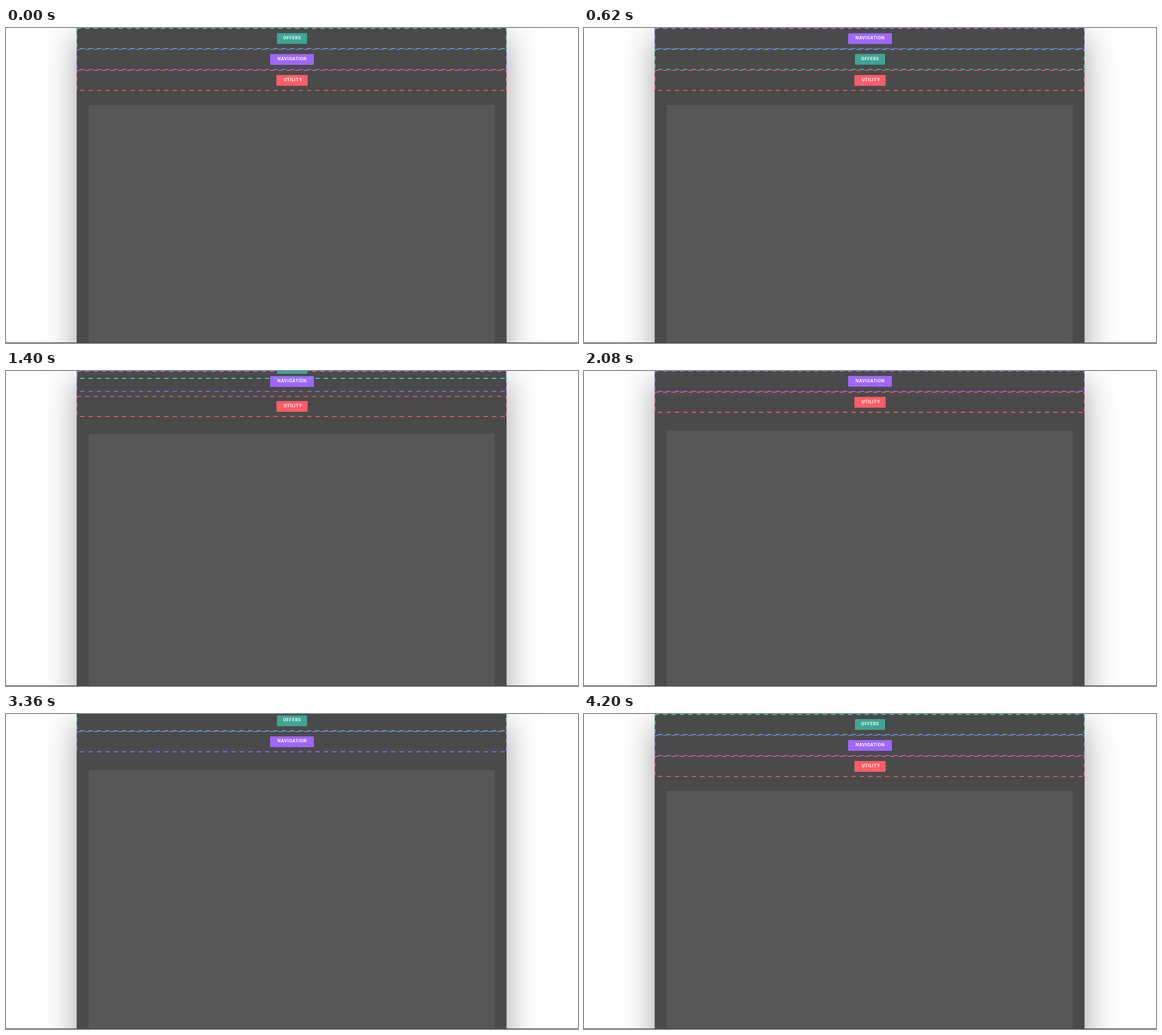
Write an HTML page that moves like this. It is 1007 px wide and 556 px high and loops after 4960 ms.

```html
<!DOCTYPE html>
<html lang="en">
<head>
<meta charset="utf-8">
<title>Banner order</title>
<style>
  html, body { margin: 0; width: 100%; height: 100%; overflow: hidden; background: #fff; }
  .stage { position: relative; width: 100%; height: 100%; overflow: hidden; contain: strict; }
  .shadow {
    position: absolute; left: 125px; top: 0; width: 756px; height: 700px;
    box-shadow: 0 16px 56px rgba(0, 0, 0, .37);
  }
  svg { position: absolute; left: 0; top: 0; display: block; }
  .edge { fill: none; stroke-width: 1.6; stroke-dasharray: 7.4 7.4; }
  text {
    font: 700 7.2px Inter, "Open Sans", sans-serif; letter-spacing: .63px;
    fill: #fff; text-anchor: middle;
  }
  .move { animation: 4960ms cubic-bezier(.65, 0, .35, 1) infinite; }
  .offers { animation-name: offers; }
  .nav { animation-name: nav; }
  .utility { animation-name: utility; }
  .pair { animation-name: pair; }
  .content { animation-name: content; }

  /* paired stops are holds; step-end makes the hard reset */
  @keyframes offers {
    0%, 2.016% { transform: translateY(0); }
    13.306%, 21.048% { transform: translateY(37px); }
    32.339% { transform: translateY(-37px); animation-timing-function: step-end; }
    84.677%, 100% { transform: translateY(0); }
  }
  @keyframes nav {
    0%, 2.016% { transform: translateY(37px); }
    13.306%, 41.129% { transform: translateY(0); }
    52.419% { transform: translateY(-74px); animation-timing-function: step-end; }
    84.677%, 100% { transform: translateY(37px); }
  }
  @keyframes utility {
    0%, 21.048% { transform: translateY(74px); }
    32.339%, 41.129% { transform: translateY(37px); }
    52.419% { transform: translateY(-37px); animation-timing-function: step-end; }
    84.677%, 100% { transform: translateY(74px); }
  }
  @keyframes pair {
    0%, 45.95% { transform: translateY(-74px); }
    57.24%, 63.75% { transform: translateY(0); }
    75.04% { transform: translateY(-37px); animation-timing-function: step-end; }
    84.677%, 100% { transform: translateY(-74px); }
  }
  @keyframes content {
    0%, 21.048% { transform: translateY(136px); }
    32.339%, 63.75% { transform: translateY(105px); }
    75.04% { transform: translateY(74px); animation-timing-function: step-end; }
    84.677%, 100% { transform: translateY(136px); }
  }
</style>
</head>
<body>
<div class="stage">
  <div class="shadow"></div>
  <svg width="1007" height="556" viewBox="0 0 1007 556">
    <defs>
      <clipPath id="clip"><rect x="124" width="757" height="556"/></clipPath>
      <!-- top, right, bottom, left: every side has its own dash start -->
      <path id="edge" class="edge" d="M124.4 .75H881M880.8 0V5.6M880.8 13V36M130.5 36.2H881M125.1 34.3V0"/>
      <g id="offers">
        <use href="#edge" stroke="#45c9b4"/>
        <rect x="477" y="9" width="53" height="19" rx=".8" fill="#3fa595"/>
        <text x="503.8" y="19.9">OFFERS</text>
      </g>
      <g id="nav">
        <use href="#edge" stroke="#9f66ff"/>
        <rect x="465" y="9" width="77" height="19" rx=".8" fill="#a066ff"/>
        <text x="503.9" y="19.9">NAVIGATION</text>
      </g>
      <g id="utility">
        <use href="#edge" stroke="#ff5c68"/>
        <rect x="476" y="9" width="55" height="19" rx=".8" fill="#ff5c68"/>
        <text x="505.3" y="19.9">UTILITY</text>
      </g>
    </defs>
    <rect x="124.4" width="756.8" height="556" fill="#4a4a4a"/>
    <g clip-path="url(#clip)">
      <rect class="move content" x="145.5" width="715" height="600" fill="#575757"/>
      <g class="move utility"><use href="#utility"/></g>
      <g class="move nav"><use href="#nav"/></g>
      <g class="move offers"><use href="#offers"/></g>
      <g class="move pair">
        <use href="#nav" y="37"/>
        <use href="#offers"/>
      </g>
    </g>
    <rect y="555" width="1007" height="1" fill="#444"/>
  </svg>
</div>
</body>
</html>
```
